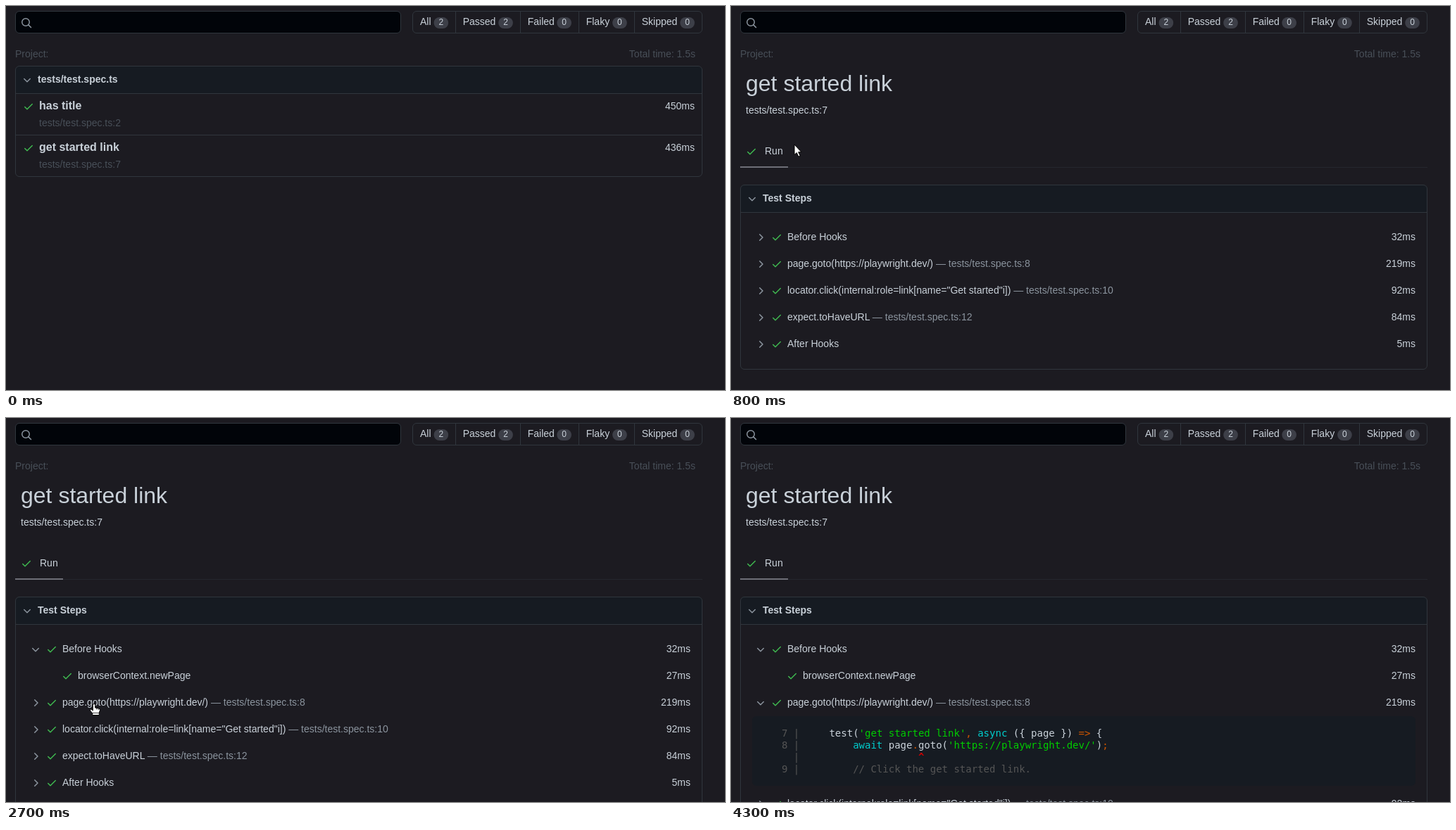
An HTML page that plays this animation: 1021 px wide and 546 px high, repeating every 4500 ms.

```html
<!DOCTYPE html>
<html lang="en">
<head>
<meta charset="utf-8">
<title>Test report</title>
<style>
  html, body { margin: 0; width: 100%; height: 100%; overflow: hidden; background: #1c1b21; }
  svg { display: block; width: 1021px; height: 546px; }
  text { font: 14px "Liberation Sans", Arial, sans-serif; fill: #c9d1d9; white-space: pre; }
  .bold { font-weight: 700; }
  .name { font-size: 16px; font-weight: 700; }
  .heading { font-size: 32px; }
  .count { font-size: 12px; text-anchor: middle; }
  .end { text-anchor: end; }
  .faint { fill: #484f58; }
  .muted { fill: #8b949e; }
  .code { font-family: "DejaVu Sans Mono", monospace; }
  .gray { fill: #555; }
  .green { fill: #0c0; }
  .cyan { fill: #0cc; }
  .orange { fill: #c50; }
  .red { fill: #c00; font-weight: 700; }
  .icon { fill: none; stroke: #8b949e; stroke-width: 1.5; stroke-linecap: round; stroke-linejoin: round; }
  .check { stroke: #3fb950; }
  .line { fill: none; stroke: #30363d; }
</style>
</head>
<body>
<svg id="stage" viewBox="0 0 1021 546"></svg>
<script>
const LOOP = 4500;
const stage = document.getElementById('stage');
const PANEL = '#161b22';

function add(parent, tag, attrs = {}, content) {
  const el = document.createElementNS('http://www.w3.org/2000/svg', tag);
  for (const key in attrs) el.setAttribute(key, attrs[key]);
  if (content !== undefined) el.textContent = content;
  parent.appendChild(el);
  return el;
}

const group = (parent = stage) => add(parent, 'g');
const show = (el, on) => el.setAttribute('display', on ? 'inline' : 'none');
const text = (g, x, y, content, cls = '') => add(g, 'text', { x, y, class: cls }, content);
const path = (g, d, cls) => add(g, 'path', { d, class: cls });
const rect = (g, x, y, width, height, fill, rx = 0) =>
  add(g, 'rect', { x, y, width, height, fill, rx });
const frame = (g, x, y, width, height, fill = 'none') =>
  add(g, 'rect', { x: x + .5, y: y + .5, width: width - 1, height: height - 1, rx: 5.5, fill, stroke: '#30363d' });

// Icons sit on a 16px grid.
const check = (g, x, y) => path(g, `M${x + 2.75} ${y + 8.5}l3.25 3.25l7.25 -7.25`, 'icon check');
const chevron = (g, x, y, open) =>
  path(g, open ? `M${x + 3.75} ${y + 6.5}l4.25 4.25l4.25 -4.25`
               : `M${x + 6.75} ${y + 3.75}l4.25 4.25l-4.25 4.25`, 'icon');

function parts(g, x, y, cls, spans) {
  const el = text(g, x, y, undefined, cls);
  for (const [content, tone = ''] of spans) add(el, 'tspan', { class: tone }, content);
}

function drawTop() {
  const g = group();
  frame(g, 13, 7, 548, 32, '#010409');
  add(g, 'circle', { cx: 28, cy: 23, r: 5.25, class: 'icon' });
  path(g, 'M31.9 26.9l3.6 3.6', 'icon');

  frame(g, 577, 7, 412, 32);
  const filters = [['All', 2, 588, 607.5], ['Passed', 2, 648.7, 699.2], ['Failed', 0, 740.7, 782.3],
                   ['Flaky', 0, 823.7, 861.1], ['Skipped', 0, 902.7, 957.2]];
  for (const [label, count, x, pill] of filters) {
    text(g, x, 27, label);
    rect(g, pill, 16, 20.7, 16, '#3d3f48', 8);
    text(g, pill + 10.35, 27, count, 'count');
  }
  for (const x of [638.5, 730.5, 813.5, 892.5]) path(g, `M${x} 8V38`, 'line');

  text(g, 13, 73, 'Project:', 'faint');
  text(g, 979, 73, 'Total time: 1.5s', 'faint end');
}

function cardHead(g, y, height, title) {
  rect(g, 13.5, y + .5, 975, 39, PANEL, 5.5);
  frame(g, 13, y, 976, height);
  path(g, `M14 ${y + 39.5}H988`, 'line');
  chevron(g, 22, y + 12, true);
  text(g, 45, y + 24, title, 'bold');
}

function drawList() {
  const g = group();
  g.hover = rect(g, 14, 184, 974, 58, PANEL);
  cardHead(g, 85, 158, 'tests/test.spec.ts');
  path(g, 'M14 183.5H988', 'line');
  [['has title', 2, '450ms'], ['get started link', 7, '436ms']].forEach(([title, line, time], i) => {
    const y = 147 + 59 * i;
    check(g, 24, y - 12);
    text(g, 47, y, title, 'name');
    text(g, 47, y + 24, 'tests/test.spec.ts:' + line, 'faint');
    text(g, 978, y, time, 'end');
  });
  return g;
}

function step(g, y, title, line, time, open) {
  chevron(g, 34, y - 12, open);
  check(g, 57, y - 12);
  parts(g, 80, y, '', line ? [[title], [` — tests/test.spec.ts:${line}`, 'muted']] : [[title]]);
  text(g, 972, y, time, 'end');
}

function drawCode(g) {
  rect(g, 30, 424, 942, 99, PANEL, 6);
  const lines = [
    [['7 |', 'gray'], ['     test('], ["'get started link'", 'green'], [',', 'orange'], [' '],
     ['async', 'cyan'], [' ({ page }) '], ['=>', 'orange'], [' {']],
    [['8 |', 'gray'], [' '.repeat(9)], ['await', 'cyan'], [' page'], ['.', 'orange'], ['goto('],
     ["'https://playwright.dev/'", 'green'], [')'], [';', 'orange']],
    [['  |', 'gray'], [' '.repeat(20)], ['^', 'red']],
    [['9 |         // Click the get started link.', 'gray']]
  ];
  lines.forEach((spans, i) => parts(g, 72, 453 + 17 * i, 'code', spans));
}

// opened: how many of the first two steps are unfolded
function drawSteps(parent, opened) {
  const g = group(parent);
  cardHead(g, 254, opened ? 400 : 263, 'Test Steps');
  let y = 333;
  step(g, y, 'Before Hooks', 0, '32ms', opened > 0);
  if (opened > 0) {
    y += 38;
    check(g, 79, y - 12);
    text(g, 102, y, 'browserContext.newPage');
    text(g, 972, y, '27ms', 'end');
  }
  step(g, y += 38, 'page.goto(https://playwright.dev/)', 8, '219ms', opened > 1);
  if (opened > 1) {
    drawCode(g);
    y += 106;
  }
  step(g, y += 38, 'locator.click(internal:role=link[name="Get started"i])', 10, '92ms');
  step(g, y += 38, 'expect.toHaveURL', 12, '84ms');
  step(g, y += 38, 'After Hooks', 0, '5ms');
  return g;
}

function drawDetail() {
  const g = group();
  text(g, 21, 121, 'get started link', 'heading');
  text(g, 21, 153, 'tests/test.spec.ts:7');
  check(g, 21, 199);
  text(g, 48, 211, 'Run');
  add(g, 'path', { d: 'M13 229.5H989', stroke: '#25272e' });
  rect(g, 13, 228, 68, 2, '#6e6f78');
  g.steps = [0, 1, 2].map(n => drawSteps(g, n));
  return g;
}

function drawArrow(parent) {
  const g = group(parent);
  add(g, 'path', { d: 'M0 0V14.5L3.3 11.6L5.8 17.2L8.2 16.1L5.7 10.7H10Z', fill: '#fff', stroke: '#000' });
  return g;
}

function drawHand(parent) {
  const g = group(parent);
  add(g, 'path', {
    d: 'M-1.7 1Q-1.7 -.5 0 -.5Q1.7 -.5 1.7 1V5L6.5 5.8Q8.7 6.3 8.5 8.5L7.3 12V15.5H-2.2V13L-5.4 9Q-6 6.8 -4 7L-1.7 9Z',
    fill: '#fff', stroke: '#000'
  });
  add(g, 'path', { d: 'M-2 12.4H7M3.8 5.6V7.6M6.2 6V8', stroke: '#000', 'stroke-width': .8 });
  return g;
}

drawTop();
const list = drawList();
const detail = drawDetail();
const cursor = group();
const arrow = drawArrow(cursor);
const hand = drawHand(cursor);

// Pointer stops: time, x, y, is a hand
const stops = [
  [200, 92, 238, 0], [300, 91, 217, 0], [400, 90, 197, 1], [700, 90, 197, 0],
  [1200, 86, 222, 0], [1300, 88, 270, 1], [1400, 93, 312, 0], [1500, 97, 331, 1],
  [2400, 102, 352, 0], [2600, 116, 387, 0], [2700, 125, 407, 1],
  [3800, 130, 396, 1], [3900, 127, 336, 1], [4000, 117, 246, 0],
  [4100, 92, 124, 0], [4200, 48, 8, 0]
];

function render(t) {
  show(list, t < 700);
  show(list.hover, t >= 200);
  show(detail, t >= 800);
  const opened = (t >= 1800) + (t >= 3000);
  detail.steps.forEach((g, i) => show(g, i === opened));

  const stop = stops.filter(s => s[0] <= t).pop();
  show(cursor, stop && t < 4300);
  if (!stop) return;
  const [, x, y, isHand] = stop;
  cursor.setAttribute('transform', `translate(${x} ${y})`);
  show(arrow, !isHand);
  show(hand, isHand);
}

const start = performance.now();
function tick() {
  render((performance.now() - start) % LOOP);
  requestAnimationFrame(tick);
}
render(0);
requestAnimationFrame(tick);
</script>
</body>
</html>
```
